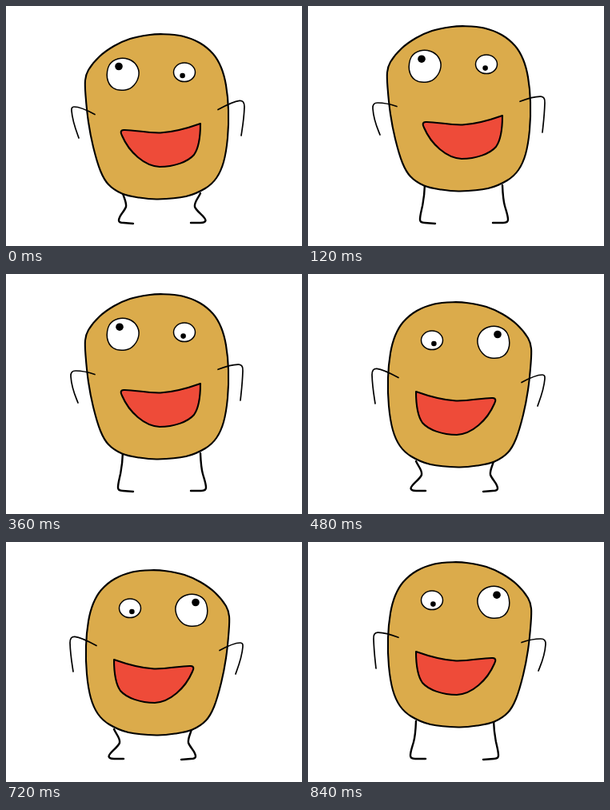
An HTML page with a canvas for the animation above (960 ms loop, 370 by 300 pixels).

```html
<!DOCTYPE html>
<html lang="en">
<head>
<meta charset="utf-8">
<title>Dancing potato</title>
<style>
  html, body { margin: 0; width: 100%; height: 100%; overflow: hidden; background: #fff; }
  canvas { display: block; }
</style>
</head>
<body>
<canvas id="stage" width="370" height="300"></canvas>
<script>
const ctx = document.getElementById('stage').getContext('2d');
const STEP = 120, STEPS = 8, HOP = 10, MIRROR = 378;
const INK = '#000', SKIN = '#dbab4b', LIPS = '#ee4b39';

const BODY = [[99,93], [103,80], [117,63], [135,50], [155,41], [178,36.2], [197,35.2],
  [220,37.5], [242,46], [259,60], [269,77], [275,99], [278,130], [277,165], [272,195],
  [263,215], [249,228], [225,238], [190,241.5], [166,239.5], [145,234.5], [128,223],
  [118,206], [109,176], [103,145], [99.5,112]];
const BIG_EYE = [[140,66], [153,66.5], [163,74], [166,86], [160,99], [149,105],
  [134,102.5], [126.5,90], [129,74]];

// The two poses: crouched and stretched, each a list of limb paths.
const LIMBS = {
  crouched: {
    arms: ['M111 135.5 C101 130 90 126 85 126 Q81.5 126 82 131 C83 144 87 154 91 165',
           'M265 129.5 C275 124 285 119 292 118.3 Q298 118 298 126 C297.5 142 295.5 152 294 162'],
    legs: ['M145.5 233 C148 241 151 246 150 251 C148 257 141 262 141 268 Q141 271 147 271 L159 272',
           'M243 234 C240 241 235 245 236 251 C238 257 249 263 249.5 268 Q249 271 243 271 L231 271']
  },
  stretched: {
    arms: ['M111 125.5 C101 122 92 121 87 121 Q80.5 121 81 128 C82 143 86 151 90 161',
           'M265 119.3 C275 115.5 285 113 291 113.2 Q296.5 113.5 296 121 C295.5 138 294 148 293 158'],
    legs: ['M146 223 C145.5 238 144.5 242 143 250 C141 259 140 262 140 267 Q140 271 146 271 L159 272',
           'M243 224 C243.5 236 244 243 246 250 C248 257 250 262 250 267 Q250 271 244 271 L231 271']
  }
};
const MOUTH = new Path2D('M147 155 C160 154.5 175 159 193 158.5 C213 157.5 229 152 243 147 ' +
  'C243 161 242 176 235 186 C227 195 210 201 192 201 C173 200 154 183 145 162 Q141.5 155.5 147 155 Z');

// Closed smooth curve through the given points.
function blob(pts) {
  const path = new Path2D(), n = pts.length;
  const at = i => pts[(i + n) % n];
  path.moveTo(...pts[0]);
  for (let i = 0; i < n; i++) {
    const [a, b, c, d] = [at(i - 1), at(i), at(i + 1), at(i + 2)];
    path.bezierCurveTo(b[0] + (c[0] - a[0]) / 6, b[1] + (c[1] - a[1]) / 6,
      c[0] - (d[0] - b[0]) / 6, c[1] - (d[1] - b[1]) / 6, c[0], c[1]);
  }
  path.closePath();
  return path;
}

function oval(x, y, rx, ry = rx) {
  const path = new Path2D();
  path.ellipse(x, y, rx, ry, 0, 0, Math.PI * 2);
  return path;
}

const body = blob(BODY), bigEye = blob(BIG_EYE), smallEye = oval(223, 82.8, 13.5, 11.8);

function shape(path, fill, width) {
  ctx.fillStyle = fill;
  ctx.fill(path);
  if (width) line(path, width);
}

function line(path, width) {
  ctx.lineWidth = width;
  ctx.stroke(path);
}

function draw(up, flipped) {
  const limbs = up ? LIMBS.stretched : LIMBS.crouched;
  const roll = up ? 1 : 0;
  ctx.setTransform(1, 0, 0, 1, 0, 0);
  ctx.fillStyle = '#fff';
  ctx.fillRect(0, 0, 370, 300);
  if (flipped) ctx.setTransform(-1, 0, 0, 1, MIRROR, 0);
  ctx.strokeStyle = INK;
  ctx.lineCap = ctx.lineJoin = 'round';

  limbs.legs.forEach(d => line(new Path2D(d), 2.4));
  ctx.save();
  if (up) ctx.translate(0, -HOP);
  shape(body, SKIN, 2.1);
  shape(bigEye, '#fff', 1.5);
  shape(smallEye, '#fff', 1.5);
  shape(oval(141 + roll, 75.5 + roll * 0.7, 4.8), INK);
  shape(oval(220.6 + roll, 87 + roll * 0.6, 3.3), INK);
  shape(MOUTH, LIPS, 2.1);
  ctx.restore();
  limbs.arms.forEach(d => line(new Path2D(d), 1.7));
}

const start = performance.now();
function tick() {
  const step = Math.floor((performance.now() - start) / STEP) % STEPS;
  draw(step % 2 === 1, step >= STEPS / 2);
  requestAnimationFrame(tick);
}
tick();
</script>
</body>
</html>
```
